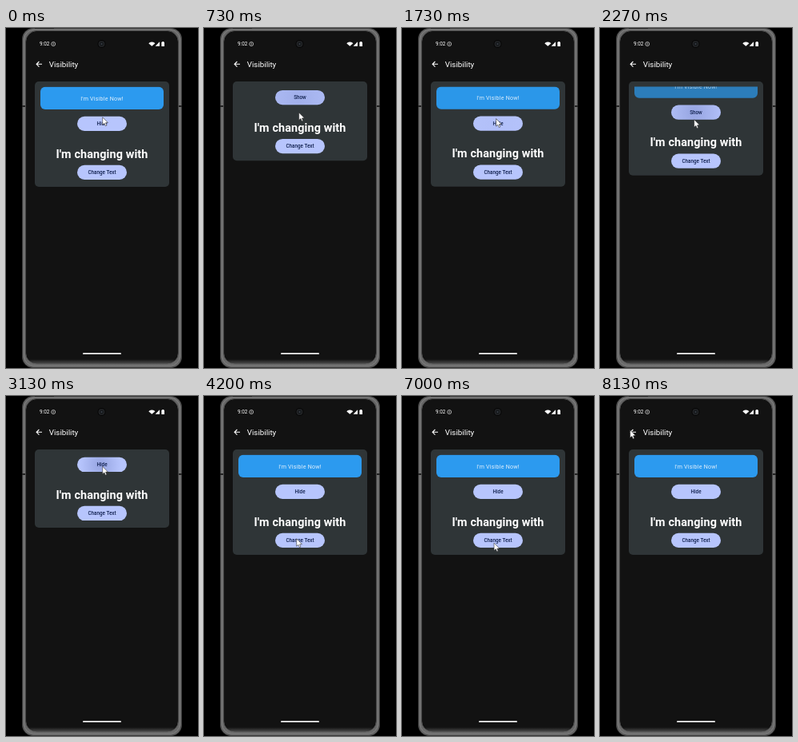
An HTML page with a canvas for the animation above (8190 ms loop, 240 px wide and 426 px high).

```html
<!DOCTYPE html>
<html lang="en">
<head>
<meta charset="utf-8">
<title>Visibility</title>
<style>
html, body { margin: 0; width: 100%; height: 100%; overflow: hidden; background: #000; }
canvas { display: block; width: 240px; height: 426px; }
</style>
</head>
<body>
<canvas id="stage" width="240" height="426"></canvas>
<script>
const ctx = document.getElementById('stage').getContext('2d');
const LOOP = 8190;
const FULL_SHIFT = 34.8;
const TOGGLES = [500, 1373, 2200, 3118];
const TEXT_PRESSES = [4330, 4940, 5580, 6430, 7050];

// time, x, y of the pointer tip
const POINTER = [
  [0, 121, 112], [450, 120, 113], [600, 120, 113], [930, 117, 93],
  [1420, 117, 93], [1780, 118, 115], [2290, 118, 115], [2600, 144, 128],
  [2870, 121, 88.5], [3450, 121, 88.5], [4000, 116, 179], [4200, 116, 179],
  [4800, 115, 182], [5400, 114, 185], [6200, 114, 185], [6600, 116, 187],
  [7250, 115, 183], [7870, 37.5, 50], [8050, 38, 43], [8190, 38, 43]
];

const smooth = u => u * u * (3 - 2 * u);

function pointerAt(t) {
  const i = POINTER.findIndex(p => p[0] > t);
  const [t0, x0, y0] = POINTER[i - 1], [t1, x1, y1] = POINTER[i];
  const u = smooth((t - t0) / (t1 - t0));
  return [x0 + (x1 - x0) * u, y0 + (y1 - y0) * u];
}

// Critically damped spring, falling from 1 to 0
function spring(ms, speed) {
  const k = Math.max(0, ms) * speed / 1000;
  return (1 + k) * Math.exp(-k);
}

function box(x, y, w, h, r, fill, stroke, line = 1) {
  ctx.beginPath();
  ctx.roundRect(x, y, w, h, r);
  if (fill) { ctx.fillStyle = fill; ctx.fill(); }
  if (stroke) { ctx.strokeStyle = stroke; ctx.lineWidth = line; ctx.stroke(); }
}

function disc(x, y, r, fill) {
  ctx.beginPath();
  ctx.arc(x, y, r, 0, Math.PI * 2);
  ctx.fillStyle = fill;
  ctx.fill();
}

function poly(points, fill) {
  ctx.beginPath();
  points.forEach(([x, y]) => ctx.lineTo(x, y));
  ctx.closePath();
  ctx.fillStyle = fill;
  ctx.fill();
}

function text(str, x, y, size, weight, color, align = 'center', spacing = 0) {
  ctx.font = `${weight} ${size}px Roboto, sans-serif`;
  ctx.letterSpacing = spacing + 'px';
  ctx.textAlign = align;
  ctx.fillStyle = color;
  ctx.fillText(str, x, y);
  ctx.letterSpacing = '0px';
}

function phone() {
  ctx.fillStyle = '#000';
  ctx.fillRect(0, 0, 240, 426);
  box(20.5, 0.5, 199, 425, 13, '#666', '#3c3c3c');
  box(22.8, 2.2, 194.4, 421, 12, null, '#808080');
  box(24.7, 3.6, 190.6, 417.5, 14, '#0a0a0a', '#4a4a4a');

  const glow = ctx.createLinearGradient(0, 415, 0, 423);
  glow.addColorStop(0, 'rgba(110,110,110,0)');
  glow.addColorStop(1, 'rgba(110,110,110,0.9)');
  box(25.7, 4.6, 188.6, 415, 13, '#121212');
  box(24.7, 412, 190.6, 10.5, [0, 0, 13, 13], glow);

  ctx.fillStyle = '#222';
  ctx.fillRect(20, 97, 4, 2);
  ctx.fillRect(216, 97, 4, 2);
  ctx.fillRect(36, 0, 24, 1);

  disc(119.5, 20, 5, '#050505');
  disc(119.5, 20, 4, '#222426');
  disc(119.5, 20, 2.4, '#15181b');
  disc(119.5, 20, 1, '#3a4048');
}

function chrome() {
  text('9:02', 42, 22.3, 6.4, 400, '#fff', 'left');
  ctx.strokeStyle = '#e4e4e4';
  ctx.lineWidth = 0.7;
  ctx.beginPath();
  ctx.arc(59.2, 20, 2.5, 0, Math.PI * 2);
  ctx.moveTo(59.2, 18.5);
  ctx.lineTo(59.2, 21.4);
  ctx.stroke();

  ctx.beginPath();
  ctx.moveTo(182.3, 22.8);
  ctx.arc(182.3, 22.8, 5.4, -Math.PI * 0.77, -Math.PI * 0.23);
  ctx.closePath();
  ctx.fillStyle = '#fff';
  ctx.fill();
  poly([[186.6, 22.8], [192, 22.8], [192, 17.2]], '#fff');
  box(194.4, 17.6, 3.6, 5.4, 0.6, '#fff');
  box(195.4, 16.9, 1.6, 1, 0, '#fff');

  ctx.strokeStyle = '#fff';
  ctx.lineWidth = 1.1;
  ctx.beginPath();
  ctx.moveTo(45, 45.3);
  ctx.lineTo(38.2, 45.3);
  ctx.moveTo(41.4, 42);
  ctx.lineTo(38.1, 45.3);
  ctx.lineTo(41.4, 48.6);
  ctx.stroke();
  text('Visibility', 53.7, 49, 9.8, 400, '#fff', 'left');
  box(96, 407, 48, 1.8, 0.9, '#f0f0f0');
}

function ripple(age, x, y) {
  if (age < 0 || age > 520) return;
  const radius = 16 + 55 * smooth(Math.min(1, age / 320));
  const alpha = 0.24 * Math.min(1, age / 60) * (1 - smooth(Math.max(0, (age - 170) / 350)));
  const shade = ctx.createRadialGradient(x, y, 0, x, y, radius);
  shade.addColorStop(0, `rgba(45,60,135,${alpha})`);
  shade.addColorStop(0.5, `rgba(45,60,135,${alpha * 0.5})`);
  shade.addColorStop(1, 'rgba(45,60,135,0)');
  ctx.fillStyle = shade;
  ctx.fillRect(89, y - 25, 62, 50);
}

function button(label, cy, t, presses) {
  box(89, cy - 9.2, 62, 18.2, 9.1, '#b7c5fd');
  ctx.save();
  ctx.clip();
  presses.forEach(p => ripple(t - p, 118, cy));
  ctx.restore();
  text(label, 120, cy + 1.9, 6.3, 500, '#10204e');
}

function panelState(t) {
  const count = TOGGLES.filter(s => s <= t).length;
  const shown = count % 2 === 0;
  if (!count) return { shown, hidden: 0, alpha: 1 };
  const age = t - TOGGLES[count - 1];
  const move = spring(age, 20), fade = spring(age, 15);
  return shown
    ? { shown, hidden: move, alpha: 1 - fade }
    : { shown, hidden: 1 - move, alpha: fade };
}

function card(t) {
  const { shown, hidden, alpha } = panelState(t);
  const up = FULL_SHIFT * hidden;
  box(36, 67, 168, 132 - up, 5, '#2f3537');

  ctx.save();
  ctx.beginPath();
  ctx.rect(42, 73.5, 156, 40);
  ctx.clip();
  ctx.globalAlpha = alpha;
  box(43, 73.7 - up, 154, 28.3, 6, '#2c9aef');
  text("I'm Visible Now!", 120, 90.5 - up, 7.1, 400, '#e3f0fb', 'center', 0.22);
  ctx.restore();

  button(shown ? 'Hide' : 'Show', 120 - up, t, TOGGLES.map(s => s - 75));
  text("I'm changing with", 120, 162.5 - up, 14.4, 700, '#fff', 'center', 0.12);
  button('Change Text', 181 - up, t, TEXT_PRESSES);
}

function pointer(t) {
  const [x, y] = pointerAt(t);
  ctx.save();
  ctx.translate(x - 0.3, y - 0.2);
  ctx.scale(1.1, 1.1);
  const shape = [[0, 0], [0, 8.6], [2, 6.9], [3.3, 9.9], [4.7, 9.3], [3.5, 6.4], [6.1, 6.2]];
  poly(shape, '#fff');
  ctx.strokeStyle = '#222';
  ctx.lineWidth = 0.5;
  ctx.stroke();
  ctx.restore();
}

function draw(now) {
  const t = now % LOOP;
  phone();
  chrome();
  card(t);
  pointer(t);
}

let start;
function tick(now) {
  start ??= now;
  draw(now - start);
  requestAnimationFrame(tick);
}
draw(0);
requestAnimationFrame(tick);
</script>
</body>
</html>
```
